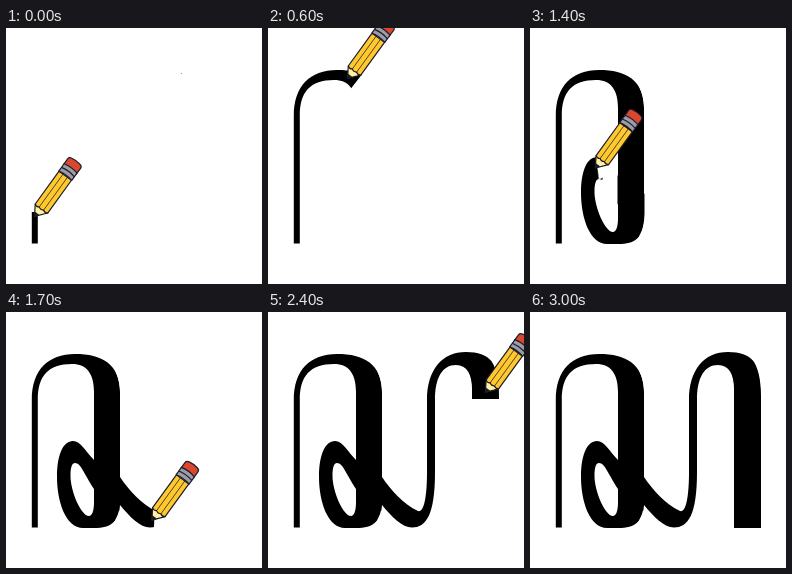
Recreate the animation shown at these times as an HTML page without scripts. Size 256 px wide and 256 px high, loop 5 s.

```html
<!DOCTYPE html>
<html lang="en">
<head>
<meta charset="utf-8">
<title>Pencil stroke order</title>
<style>
  html, body { margin: 0; width: 100%; height: 100%; overflow: hidden; background: #fff; }
  svg { display: block; width: 100%; height: 100%; }

  .trail, .pencil, .speck { animation: 5s -5ms infinite; }

  .trail {
    fill: none;
    stroke: #fff;
    stroke-width: 27;
    stroke-linejoin: round;
    stroke-dasharray: 1000;
    animation-name: draw;
  }
  .pencil {
    offset-path: path("M28.5 217V86C28.5 58 46 47 66 47C88 47 101 60 101 86V186C101 204 92 210 80 210C66 210 57 188 57 166C57 150 61 139 67 138C75 137 80 155 90 163L114 180C128 194 138 207 149 207C160 207 163 196 163 180V86C163 60 178 47 194 47C212 47 217.5 60 217.5 84V217");
    offset-rotate: 0deg;
    animation-name: move;
  }
  .speck { animation-name: blink; animation-timing-function: step-end; }

  /* the ink front runs slightly ahead of the tip on thick strokes */
  @keyframes draw {
    0%  { stroke-dashoffset: 967px; animation-timing-function: steps(6); }
    12% { stroke-dashoffset: 784px; animation-timing-function: steps(4); }
    20% { stroke-dashoffset: 663px; animation-timing-function: steps(4); }
    28% { stroke-dashoffset: 526px; animation-timing-function: steps(6); }
    40% { stroke-dashoffset: 309px; animation-timing-function: steps(4); }
    48% { stroke-dashoffset: 180px; animation-timing-function: steps(5); }
    58%, 100% { stroke-dashoffset: 40px; }
  }
  @keyframes move {
    0%  { offset-distance: 30px; visibility: visible; animation-timing-function: steps(6); }
    12% { offset-distance: 206px; animation-timing-function: steps(4); }
    20% { offset-distance: 327px; animation-timing-function: steps(4); }
    28% { offset-distance: 472px; animation-timing-function: steps(6); }
    40% { offset-distance: 688px; animation-timing-function: steps(4); }
    48% { offset-distance: 812px; animation-timing-function: steps(5); }
    58% { offset-distance: 943px; visibility: visible; animation-timing-function: step-end; }
    60%, 100% { offset-distance: 943px; visibility: hidden; }
  }
  @keyframes blink {
    0% { opacity: 1; }
    2%, 100% { opacity: 0; }
  }
</style>
</head>
<body>
<svg viewBox="0 0 256 256">
  <mask id="ink" maskUnits="userSpaceOnUse" x="0" y="0" width="256" height="256">
    <path class="trail" d="M28.5 217V86C28.5 58 46 47 66 47C88 47 101 60 101 86V186C101 204 92 210 80 210C66 210 57 188 57 166C57 150 61 139 67 138C75 137 80 155 90 163L114 180C128 194 138 207 149 207C160 207 163 196 163 180V86C163 60 178 47 194 47C212 47 217.5 60 217.5 84V217"/>
  </mask>

  <g mask="url(#ink)">
    <path fill-rule="evenodd" d="
      M25.8 215.5V88C25.8 58 42 42 69 42C96 42 114 52 114 80V165
      C122 177 136 193 150 199C157 201 159 180 159 160V88
      C159 58 174 40 198 40C222 40 231 52 231 76V216H204V78
      C204 62 199 53 188 53C174 53 167 66 167 88V160
      C167 203 158 215.5 144 215.5C134 215.5 124 205 114 193
      C113 209 106 216 88 216H77C60 216 51 190 51 165
      C51 143 57 129 67 129C75 129 79 139 88 148V80
      C88 62 81 52 66 52C42 52 31.8 64 31.8 88V215.5Z
      M69 151C75 151 78 162 88 177V190C88 199 86 204 83 204
      C75 204 64.5 179 64.5 164C64.5 155 66 151 69 151Z"/>
  </g>

  <circle class="speck" cx="175.5" cy="45.5" r=".6" fill="#888"/>

  <g class="pencil">
    <g transform="translate(.8 2) rotate(36)" stroke="#1c1a2b" stroke-width="1.2" stroke-linejoin="round">
      <path fill="#fdf3a0" d="M-1 0L-7.7-10.5H7.7Z"/>
      <path fill="#1c1a2b" d="M-1 0L-3.2-3.5H1.3Z"/>
      <path fill="#ffc82c" d="M-7.7-51V-10.5Q-5-8.5-2.7-10.5Q0-8.5 2.7-10.5Q5-8.5 7.7-10.5V-51Z"/>
      <path fill="none" stroke-width=".7" d="M-2.7-51V-10.5M2.7-51V-10.5"/>
      <path fill="#d9472f" d="M-8-59V-66Q-8-68.5-5-69Q0-70 5-69Q8-68.5 8-66V-59Z"/>
      <path fill="#9b9ca6" d="M-8-51V-60Q0-62 8-60V-51Q0-53 -8-51Z"/>
      <path fill="none" d="M-8-55.5Q0-57.5 8-55.5"/>
    </g>
  </g>
</svg>
</body>
</html>
```
